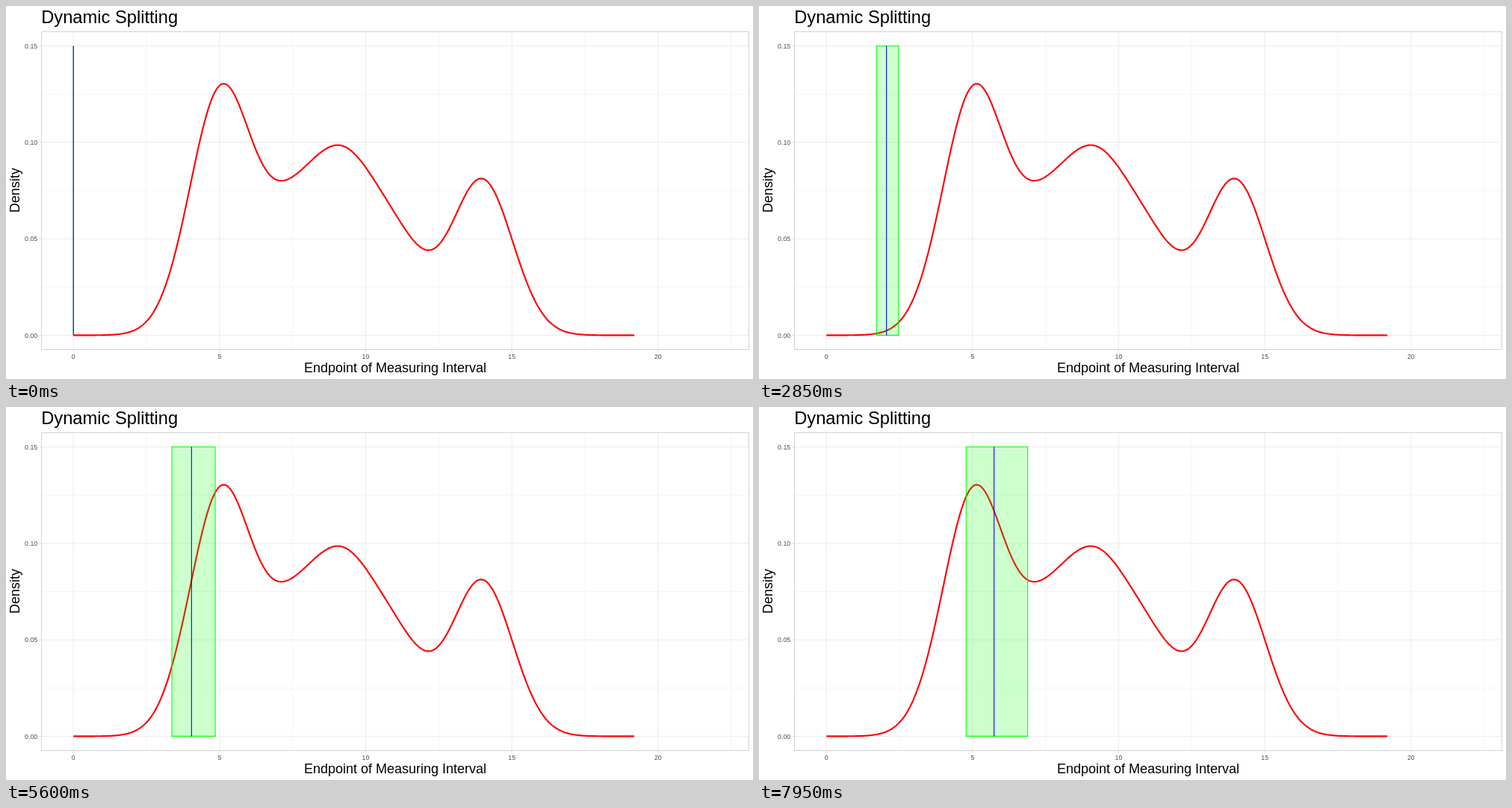
An HTML page for the animation above (8000 ms loop, 1000 by 500 pixels).

```html
<!DOCTYPE html>
<html lang="en">
<head>
<meta charset="utf-8">
<title>Dynamic Splitting</title>
<style>
  html, body { margin: 0; width: 100%; height: 100%; overflow: hidden; background: #fff; }
  svg { display: block; width: 1000px; height: 500px; }
  text { font-family: "Liberation Sans", Arial, sans-serif; }
  .tick { font-size: 8.8px; fill: #4d4d4d; }
  .title { font-size: 23.7px; }
  .label { font-size: 18px; text-anchor: middle; }
</style>
</head>
<body>
<svg viewBox="0 0 1000 500">
  <g id="axes"></g>
  <path id="curve" fill="none" stroke="#f00" stroke-width="2.13" stroke-linejoin="round"/>
  <path id="band" fill="#0f0" fill-opacity="0.2" stroke="#0f0" stroke-width="1.07"/>
  <path id="split" stroke="#00f" stroke-width="1.07"/>
  <rect x="47.5" y="34.5" width="947" height="426" fill="none" stroke="#d3d3d3"/>
  <text class="title" x="47.2" y="23">Dynamic Splitting</text>
  <text class="label" x="521" y="491">Endpoint of Measuring Interval</text>
  <text class="label" transform="translate(18 247) rotate(-90)">Density</text>
</svg>
<script>
const $ = id => document.getElementById(id);
const X0 = 90.2, DX = 39.13, TOP = 53.5, BASE = 441.4;
const px = v => X0 + v * DX;
const py = v => BASE - v * (BASE - TOP) / 0.15;

function add(tag, attrs, text = "") {
  const el = document.createElementNS("http://www.w3.org/2000/svg", tag);
  for (const k in attrs) el.setAttribute(k, attrs[k]);
  el.textContent = text;
  $("axes").append(el);
}
const vLine = (x, y1, y2, stroke) => add("path", { d: `M${x} ${y1}V${y2}`, stroke });
const hLine = (y, x1, x2, stroke) => add("path", { d: `M${x1} ${y}H${x2}`, stroke });

// Minor grid lines first, then major ones with ticks and labels
for (let i = 0; i < 5; i++) vLine(px(2.5 + 5 * i), 35, 460, "#f4f4f4");
for (let i = 0; i < 3; i++) hLine(py(0.025 + 0.05 * i), 48, 994, "#f4f4f4");
for (let i = 0; i < 5; i++) {
  const x = px(5 * i);
  vLine(x, 35, 460, "#ebebeb");
  vLine(x, 461, 463.5, "#d3d3d3");
  add("text", { class: "tick", x, y: 473, "text-anchor": "middle" }, 5 * i);
}
for (let i = 0; i < 4; i++) {
  const y = py(0.05 * i);
  hLine(y, 48, 994, "#ebebeb");
  hLine(y, 44.5, 47, "#d3d3d3");
  add("text", { class: "tick", x: 42.2, y: y + 3.2, "text-anchor": "end" }, (0.05 * i).toFixed(2));
}

// Density as a sum of bell curves: mean, deviation, height
const bells = [
  [5.05, 1.065, 0.126],
  [7.5, 1.066, 0.056],
  [9.15, 1, 0.0645],
  [10.85, 1.15, 0.0505],
  [13.99, 1.04, 0.08]
];
const density = x => bells.reduce((sum, [m, s, h]) => sum + h * Math.exp(-(((x - m) / s) ** 2) / 2), 0);

const END = 19.19, SAMPLES = 400;
const curve = Array.from({ length: SAMPLES + 1 }, (_, i) => {
  const x = END * i / SAMPLES;
  return `${px(x)} ${py(density(x))}`;
});
$("curve").setAttribute("d", "M" + curve.join("L"));

// The split and both band edges move at constant speed in 50 ms steps
const STEP = 50, LOOP = 8000;
const SPEED = { left: 0.023535, split: 0.02824, right: 0.0339 };

function draw() {
  const t = Math.floor(performance.now() % LOOP / STEP) * STEP;
  const at = key => X0 + SPEED[key] * t;
  $("band").setAttribute("d", `M${at("left")} ${TOP}H${at("right")}V${BASE}H${at("left")}Z`);
  $("split").setAttribute("d", `M${at("split")} ${TOP}V${BASE}`);
  requestAnimationFrame(draw);
}
draw();
</script>
</body>
</html>
```
